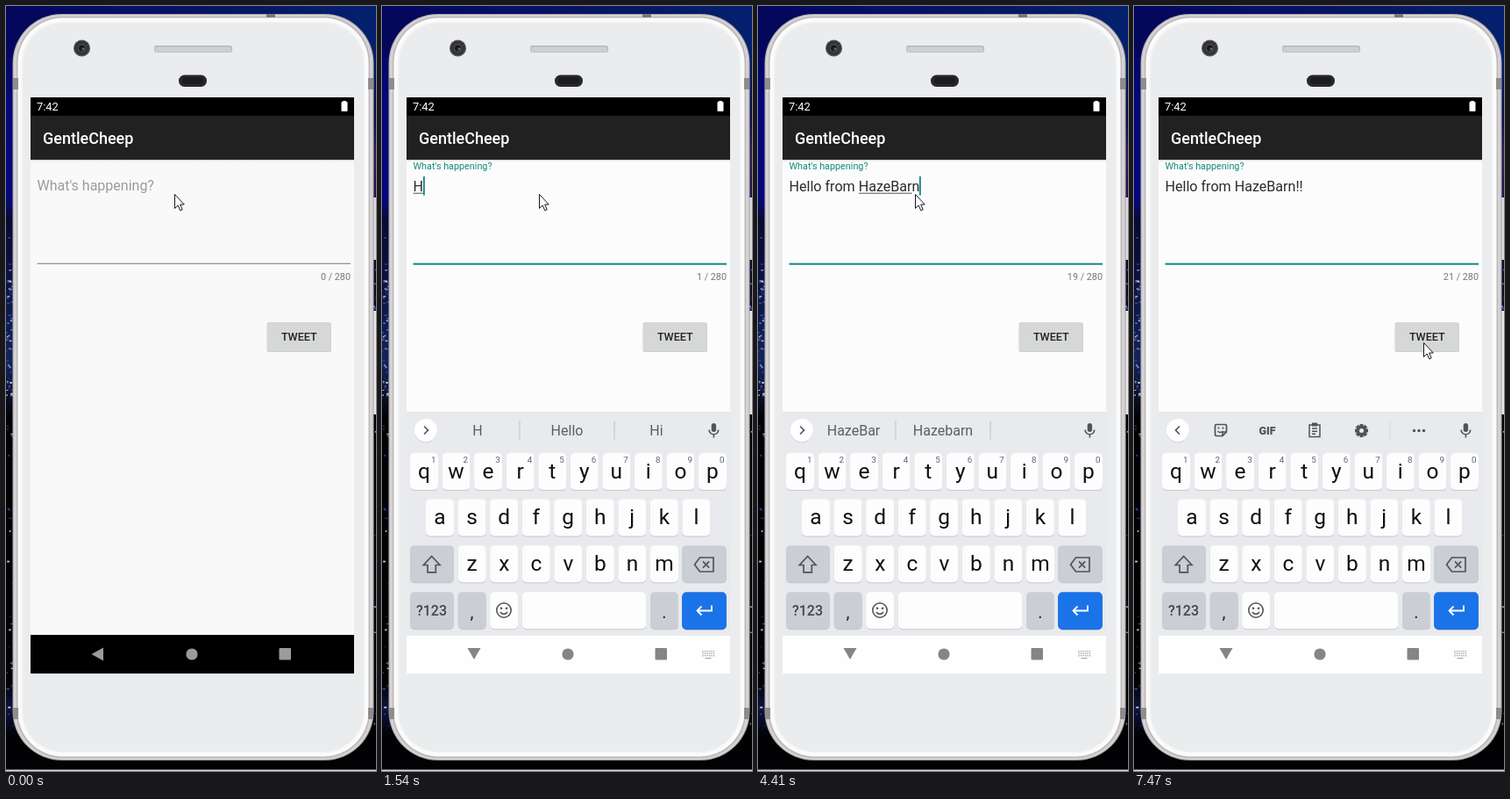
An HTML page with a canvas for the animation above (8 s loop, 422 by 871 pixels).

```html
<!DOCTYPE html>
<html lang="en">
<head>
<meta charset="utf-8">
<title>Compose</title>
<style>
html, body { margin: 0; width: 422px; height: 871px; overflow: hidden; background: #000; }
canvas { display: block; }
</style>
</head>
<body>
<canvas id="stage" width="422" height="871"></canvas>
<script>
const ctx = document.getElementById('stage').getContext('2d');
const LOOP = 8000, TEAL = '#128a7c', ICON = '#50545a', FONT = 'Roboto, sans-serif';
const TEXT_X = 35.5, BODY = 16.1;

// start time, text, underlined range, suggestions
const typing = [
  [0, ''],
  [1390, 'H'],
  [1540, 'H', 0, 1, 'H,Hello,Hi'],
  [1850, 'He', 0, 1, 'H,Hello,Hi'],
  [2130, 'Hel', 0, 3, 'He,Hello,Hey'],
  [2410, 'Hello', 0, 4, 'Hell,Hello,Hells'],
  [2570, 'Hello f', 6, 7, 'f,for,from'],
  [2720, 'Hello fr', 6, 8, 'fr,from,friend'],
  [2870, 'Hello from', 6, 9, 'fro,from,front'],
  [2990, 'Hello from', 6, 10, 'from,from,front'],
  [3270, 'Hello from ', 0, 0, 'the,my,a'],
  [3510, 'Hello from H', 11, 12, 'H,Hi,Here'],
  [3660, 'Hello from Ha', 11, 12, 'H,Hi,Here'],
  [3780, 'Hello from Haz', 11, 13, 'Ha,Have,Happy'],
  [3900, 'Hello from Haze', 11, 15, 'Haze,Haze,Hazel'],
  [4050, 'Hello from HazeB', 11, 15, 'Haze,Haze,Hazel'],
  [4170, 'Hello from HazeBa', 11, 16, 'HazeB,Haze b,'],
  [4290, 'Hello from HazeBar', 11, 17, 'HazeBa,Haze bar,'],
  [4410, 'Hello from HazeBarn', 11, 18, 'HazeBar,Hazebarn,'],
  [4660, 'Hello from HazeBarn', 11, 19, 'HazeBar,Hazebarn,'],
  [4930, 'Hello from HazeBarn!', 0, 0, 'HazeBar,Hazebarn,'],
  [5050, 'Hello from HazeBarn!!']
];
const pointer = [
  [0, 192, 214], [300, 179, 214], [6010, 188, 222], [6130, 214, 252],
  [6250, 248, 286], [6370, 277, 314], [6520, 300, 345], [6640, 312, 364],
  [6760, 320, 376], [6910, 330, 383]
];
const caretOn = [[300, 810], [1240, 5450], [6010, 6520], [6910, 7470]];
const capsOn = [[1390, 1540], [4810, 5050]];
const slide = [[0, 298], [420, 118], [540, 32], [660, 0]];

const at = (steps, t) => steps.findLast(s => s[0] <= t);
const within = (spans, t) => spans.some(([a, b]) => t >= a && t < b);

function rect(x, y, w, h, color) {
  ctx.fillStyle = color;
  ctx.fillRect(x, y, w, h);
}
function round(x, y, w, h, r, color) {
  ctx.fillStyle = color;
  ctx.beginPath();
  ctx.roundRect(x, y, w, h, r);
  ctx.fill();
}
function disc(x, y, r, color) {
  ctx.fillStyle = color;
  ctx.beginPath();
  ctx.arc(x, y, r, 0, 7);
  ctx.fill();
}
function text(str, x, y, size, color, align = 'left', weight = 400) {
  ctx.font = `${weight} ${size}px ${FONT}`;
  ctx.textAlign = align;
  ctx.fillStyle = color;
  ctx.fillText(str, x, y);
}
// SVG path data placed at x, y
function shape(d, x, y, fill, stroke, width = 1.7) {
  const p = new Path2D(d);
  ctx.save();
  ctx.translate(x, y);
  if (fill) { ctx.fillStyle = fill; ctx.fill(p); }
  if (stroke) { ctx.strokeStyle = stroke; ctx.lineWidth = width; ctx.stroke(p); }
  ctx.restore();
}
function gradient(x0, y0, x1, y1, ...stops) {
  const g = ctx.createLinearGradient(x0, y0, x1, y1);
  stops.forEach(([p, c]) => g.addColorStop(p, c));
  return g;
}

function city() {
  rect(0, 0, 422, 871, '#020204');
  rect(0, 0, 422, 70, gradient(0, 0, 422, 0,
    [0, '#04065a'], [.3, '#060e66'], [.6, '#081660'], [1, '#04206e']));
  rect(0, 40, 40, 430, gradient(0, 40, 0, 470,
    [0, '#04065a'], [.15, '#050878'], [.42, '#06087c'], [.47, '#080a34'], [.65, '#0c1440'], [.85, '#14245a'], [1, '#020204']));
  rect(390, 40, 32, 430, gradient(0, 40, 0, 470,
    [0, '#04206e'], [.2, '#081048'], [.3, '#2c2056'], [.5, '#141034'], [1, '#020204']));
  rect(0, 770, 30, 60, gradient(0, 770, 0, 830, [0, '#020204'], [.5, '#0c1440'], [1, '#020204']));
  let seed = 17;
  const rnd = () => (seed = seed * 16807 % 2147483647) / 2147483647;
  const tints = ['#a8c0f0', '#3c64c0', '#c8c8d8', '#4c4078', '#1c3890'];
  for (let i = 0; i < 110; i++) {
    const y = i < 65 ? 300 + rnd() * 145 : 240 + rnd() * 590;
    const right = rnd() > .75;
    rect(right ? 419 + rnd() * 3 : rnd() * 7, y, 1 + rnd() * 2.5, 1 + rnd(), tints[rnd() * 5 | 0]);
  }
  rect(0, 869.5, 422, 1.5, '#e6d6de');
}

function phone() {
  round(416, 218, 8, 71, 2, '#d9dadd');
  round(416, 347, 8, 118, 2, '#e6e7e9');
  [[7.5, 9, 412, 850, 56, '#a9a5a7'], [8.5, 10, 410, 848, 55, '#d6d2d4'],
   [12, 12, 403, 844, 52, '#bcb8ba'], [13.5, 13.5, 400, 841, 51, '#fbfbfb'],
   [17.5, 17.5, 392, 833, 47, '#f4f5f6'], [19, 19, 389, 830, 46, '#eaecee']]
    .forEach(a => round(...a));
  [82, 799].forEach(y => [8, 413].forEach(x => rect(x, y, 6, 13, '#8f8c8e')));
  rect(297, 9, 10, 4, '#77787b');

  disc(86.5, 48, 9.5, '#55565a');
  disc(86.5, 48, 8.3, '#333336');
  disc(86.5, 48, 5, '#4a4b50');
  disc(86.5, 48, 3.4, '#17181e');
  disc(88, 49, 1.5, '#596a85');
  round(169, 45, 89, 8, 3, '#b6b7ba');
  round(170, 46.5, 87, 6, 2.5, '#cfd0d2');
  round(197, 78.5, 32, 13.5, 6.5, '#28282c');
  round(201, 81, 24, 8, 4, '#1c1c21');
}

function app(t) {
  rect(28, 104, 369, 656, t < 300 ? '#f9f9f9' : '#fcfcfc');
  rect(28, 104, 369, 21, '#000');
  text('7:42', 35, 119.3, 12.8, '#fff');
  rect(384.2, 108, 3.6, 2, '#fff');
  round(382.5, 109, 7, 11, 1, '#fff');
  rect(28, 125, 369, 50, '#212121');
  rect(28, 175, 369, 2, gradient(0, 175, 0, 177, [0, '#d4d4d4'], [1, '#f5f5f5']));
  text('GentleCheep', 42, 157.3, 18, '#fff', 'left', 500);

  if (t < 300) text("What's happening?", TEXT_X, 209.5, 16, t < 150 ? '#9b9b9b' : '#6fa79f');
  else text("What's happening?", TEXT_X, 185.6, 10.8, TEAL);
  if (t < 150) rect(35.5, 292.7, 357.5, 1.2, '#8c8c8c');
  else rect(35.5, 292.7, 357.5, 2, TEAL);

  const [, str, from = 0, to = 0] = at(typing, t);
  text(str, TEXT_X, 211.2, BODY, '#2b2b2b');
  const width = n => ctx.measureText(str.slice(0, n)).width;
  const end = TEXT_X + width(str.length);
  if (to > from) rect(TEXT_X + width(from), 212.7, width(to) - width(from), 1, '#555');
  if (within(caretOn, t)) rect(Math.round(end - .4), 194, 1.8, 21.5, TEAL);
  text(`${str.length} / 280`, 393, 312.3, 10.8, '#777', 'right');

  round(297.5, 360.5, 73.5, 33.5, 2, '#cfcfcf');
  round(298, 360, 72.5, 33, 2, '#d6d7d7');
  text('TWEET', 334.3, 381, 12.6, '#222', 'center', 500);
}

function key(x, y, w, color = '#fdfdfd', shadow = '#c3c6cb') {
  round(x, y + 1, w, 42, 5, shadow);
  round(x, y, w, 42, 5, color);
}

function toolIcons() {
  shape('M-5-6.5H5Q6.5-6.5 6.5-5V2L2 6.5H-5Q-6.5 6.5-6.5 5V-5Q-6.5-6.5-5-6.5ZM6.5 2H2V6.5', 99, 483, null, ICON);
  shape('M-3.5 1Q-1 4 2.5 1', 99, 483, null, ICON, 1.4);
  disc(96.5, 480.5, 1.1, ICON);
  disc(101.5, 480.5, 1.1, ICON);
  text('GIF', 152, 487.6, 12.5, ICON, 'center', 900);
  shape('M-6-6H6V7.5H-6ZM-3-2H3M-3 1.2H3M-3 4.2H1', 206, 483, null, ICON, 1.5);
  rect(203, 474.5, 6, 4, ICON);
  ctx.save();
  ctx.translate(259.5, 483.5);
  for (let i = 0; i < 4; i++) {
    rect(-2, -7.5, 4, 15, ICON);
    ctx.rotate(Math.PI / 4);
  }
  ctx.restore();
  disc(259.5, 483.5, 6, ICON);
  disc(259.5, 483.5, 2.5, '#e8eaed');
  rect(291.5, 473, 1, 20, '#d0d3d7');
  [-5.5, 0, 5.5].forEach(d => disc(325 + d, 483.5, 1.7, ICON));
}

function suggestionStrip(words) {
  disc(50, 484, 13.3, '#d9dbde');
  disc(50, 483, 13, '#fff');
  shape(words ? 'M-2-4.5L2.5 0L-2 4.5' : 'M2-4.5L-2.5 0L2 4.5', 50, 483, null, ICON);
  if (words) {
    words.split(',').forEach((w, i) => text(w, 109 + i * 102, 489.3, 16, '#5a5e63', 'center'));
    [157, 265].forEach(x => rect(x - .5, 472.5, 1, 21, '#bfc2c7'));
  } else toolIcons();
  round(375.7, 475, 5.4, 10, 2.7, ICON);
  shape('M-5.3-.5A5.3 5.3 0 0 0 5.3-.5M0 5V8.5', 378.4, 483, null, ICON, 1.6);
}

function keyboard(t, dy) {
  const caps = within(capsOn, t), pitch = 36.55, special = '#cbced4';
  ctx.save();
  ctx.translate(0, dy);
  rect(28, 462, 369, 255, '#e8eaed');
  rect(28, 717, 369, 320, '#fefefe');
  suggestionStrip(at(typing, t)[4]);

  [['qwertyuiop', 32, 509], ['asdfghjkl', 50, 561.5], ['zxcvbnm', 86.7, 614.3]].forEach(([row, x0, y], r) => {
    [...row].forEach((c, i) => {
      const x = x0 + i * pitch;
      key(x, y, 32);
      text(caps ? c.toUpperCase() : c, x + 16, y + 28.8, 24.5, '#101010', 'center');
      if (!r) text((i + 1) % 10, x + 26.8, y + 10.5, 9.8, '#5f6368', 'center');
    });
  });

  key(32, 614.3, 50, special);
  shape('M0-9.5L9.3.5H4.6V8.8H-4.6V.5H-9.3Z', 56.7, 636, caps ? ICON : null, ICON);
  key(342.3, 614.3, 50.5, special);
  shape('M-5-8H10.5V8H-5L-11 0ZM-1.5-3.6L5.7 3.6M5.7-3.6L-1.5 3.6', 367.5, 636, null, ICON);

  key(32, 667.2, 50, special);
  text('?123', 56.5, 693.8, 16, '#42464b', 'center', 500);
  key(86.7, 667.2, 32, special);
  text(',', 102.5, 697, 20, '#222', 'center');
  key(123.2, 667.2, 32);
  shape('M8.2 0A8.2 8.2 0 1 1-8.2 0A8.2 8.2 0 1 1 8.2 0ZM-4.2 2Q0 6.8 4.2 2', 139, 688, null, ICON, 1.6);
  disc(136, 685.7, 1.3, ICON);
  disc(142, 685.7, 1.3, ICON);
  key(159.7, 667.2, 141.5);
  key(306, 667.2, 32, special);
  text('.', 321.8, 697, 20, '#222', 'center');
  key(342.3, 667.2, 50.5, '#1a73e8', '#1a6ad4');
  shape('M8.5-5V1H-7.5M-3-4L-8 1L-3 6', 367.5, 687.5, null, '#fff', 1.8);
  ctx.restore();
}

function navBar(open) {
  const color = open ? '#858585' : '#9b9b9b';
  shape(open ? 'M-7.5-7H7.5L0 6Z' : 'M-7.5 0L6-7.5V7.5Z', 105, 738, color);
  disc(212, 738, 6.6, color);
  round(311.5, 731, 13.5, 13.5, 1, color);
  if (!open) return;
  const dots = 'rgba(110, 110, 110, .6)';
  for (let r = 0; r < 3; r++)
    for (let c = 0; c < 6; c++) rect(365.3 + c * 2.5, 734 + r * 2.5, 1.4, 1.4, dots);
  rect(368.5, 742, 7, 1.2, dots);
}

function draw(t) {
  city();
  phone();
  app(t);
  ctx.save();
  ctx.beginPath();
  ctx.rect(28, 104, 369, 656);
  ctx.clip();
  rect(28, 716, 369, 44, '#000');
  const dy = at(slide, t)[1];
  if (dy < 298) keyboard(t, dy);
  navBar(dy < 298);
  ctx.restore();
  const [, x, y] = at(pointer, t);
  shape('M.5.5V16.5L4.2 13L6.8 18.9L9.2 17.8L6.7 12H11.3Z', x, y, '#fff', '#16162a', 1);
}

let start;
function frame(now) {
  start ??= now;
  draw((now - start) % LOOP);
  requestAnimationFrame(frame);
}
requestAnimationFrame(frame);
</script>
</body>
</html>
```
